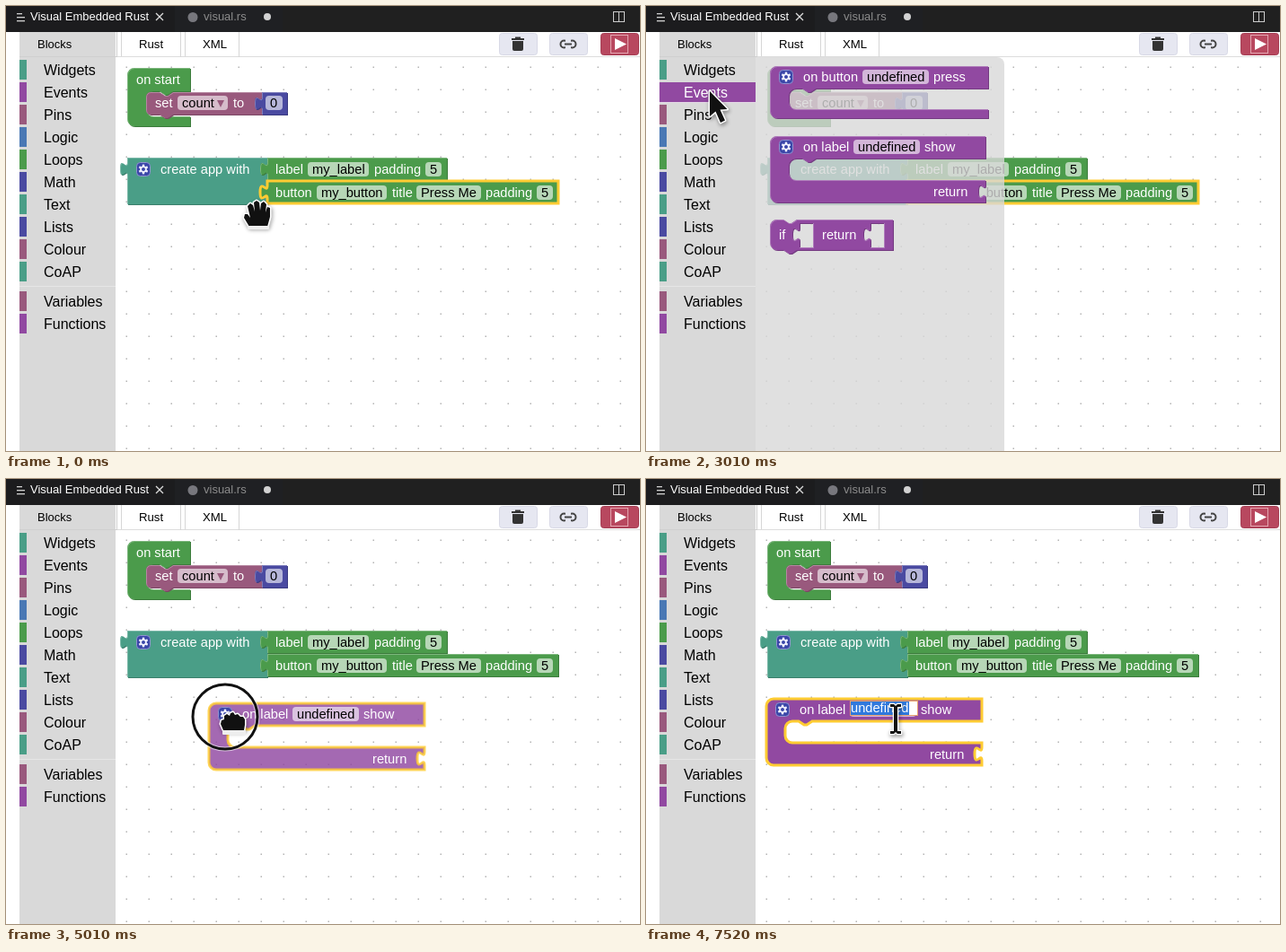
An HTML page with a canvas that plays this animation: 706 px wide and 496 px high, repeating every 8 s.

```html
<!DOCTYPE html>
<html lang="en">
<head>
<meta charset="utf-8">
<title>Block editor</title>
<style>
html, body { margin: 0; width: 100%; height: 100%; overflow: hidden; background: #fff; }
canvas { display: block; width: 706px; height: 496px; }
</style>
</head>
<body>
<canvas id="stage" width="706" height="496"></canvas>
<script>
const ctx = document.getElementById('stage').getContext('2d');
const FONT = '"Liberation Sans", Arial, sans-serif';
const LOOP = 8000;
const C = {
  teal: '#4a9e87', purple: '#9149a1', plum: '#99597d', blue: '#4a78b4',
  green: '#4b9b4b', indigo: '#4a4aa1', yellow: '#fc3'
};
const TOOLBOX = [
  ['Widgets', C.teal], ['Events', C.purple], ['Pins', C.plum], ['Logic', C.blue],
  ['Loops', C.green], ['Math', C.indigo], ['Text', C.teal], ['Lists', C.indigo],
  ['Colour', C.plum], ['CoAP', C.teal], ['Variables', C.plum], ['Functions', C.purple]
];

// start time, cursor kind, x, y, scene state
const STEPS = [
  [0, 'open', 280, 233, { picked: 'button' }],
  [480, 'arrow', 175, 160, { picked: 'button' }],
  [1000, 'arrow', 70, 93, { picked: 'button' }],
  [1470, 'arrow', 70, 93, { picked: 'button', flyout: true }],
  [3540, 'open', 165, 150, { picked: 'button', flyout: true }],
  [4010, 'open', 252, 190, { picked: 'button', flyout: true }],
  [4480, 'fist', 252, 190, { picked: 'label', flyout: true, ring: [243, 183] }],
  [5010, 'fist', 253, 271, { at: [226, 250], drag: true, ring: [244, 265] }],
  [5480, 'open', 161, 267, { at: [134, 245] }],
  [5960, 'open', 205, 265, { at: [134, 245] }],
  [6460, 'beam', 285, 272, { at: [134, 245], field: 'hover' }],
  [6990, 'beam', 278, 267, { at: [134, 245], field: 'edit' }]
];

function rect(x, y, w, h, fill) {
  ctx.fillStyle = fill;
  ctx.fillRect(x, y, w, h);
}

function round(x, y, w, h, r, fill, stroke, width = 1) {
  ctx.beginPath();
  ctx.roundRect(x, y, w, h, r);
  if (fill) { ctx.fillStyle = fill; ctx.fill(); }
  if (stroke) { ctx.strokeStyle = stroke; ctx.lineWidth = width; ctx.stroke(); }
}

function disc(x, y, r, fill) {
  ctx.beginPath();
  ctx.arc(x, y, r, 0, Math.PI * 2);
  ctx.fillStyle = fill;
  ctx.fill();
}

function line(points, color, width) {
  ctx.beginPath();
  points.forEach(([x, y], i) => i ? ctx.lineTo(x, y) : ctx.moveTo(x, y));
  ctx.strokeStyle = color;
  ctx.lineWidth = width;
  ctx.stroke();
}

function text(s, x, y, color = '#fff', size = 14.667) {
  ctx.font = `${size}px ${FONT}`;
  ctx.fillStyle = color;
  ctx.fillText(s, x, y);
}

// Block label and field; y is the middle of the row.
const label = (s, x, y) => text(s, x, y + 5);
function field(s, x, y, w) {
  round(x, y - 8, w, 16, 4, 'rgba(255,255,255,.6)');
  text(s, x + 5, y + 5, '#000');
}

const TAB_DOWN = 'v5c0,10 -8,-8 -8,7.5s8,-2.5 8,7.5';
const TAB_UP = 'c0,-10 -8,8 -8,-7.5s8,2.5 8,-7.5';
const NOTCH = 'l6,4 3,0 6,-4';
const NOTCH_BACK = 'l-6,4 -3,0 -6,-4';

function valuePath(x, y, w, h) {
  return `M${x},${y}h${w}v${h}h${-w}V${y + 20}${TAB_UP}Z`;
}

function stackPath(x, y, w, h, r = 0) {
  return `M${x},${y + r}a${r},${r} 0 0 1 ${r},${-r}H${x + 15}${NOTCH}H${x + w}v${h}H${x + 30}${NOTCH_BACK}H${x + r}a${r},${r} 0 0 1 ${-r},${-r}Z`;
}

function mouthPath(x, y, w, head, foot, h, tab) {
  const wall = x + 21;
  return `M${x},${y + 8}a8,8 0 0 1 8,-8H${x + w}V${y + head}H${wall + 30}${NOTCH_BACK}H${wall + 8}` +
    `a8,8 0 0 0 -8,8V${y + foot - 8}a8,8 0 0 0 8,8H${x + w}${tab ? TAB_DOWN : ''}V${y + h}H${x + 8}a8,8 0 0 1 -8,-8Z`;
}

function block(d, color, picked, alpha = 1) {
  const path = new Path2D(d);
  ctx.save();
  ctx.globalAlpha = alpha;
  if (!picked) {
    ctx.save();
    ctx.translate(1, 1);
    ctx.fillStyle = color;
    ctx.fill(path, 'evenodd');
    ctx.fillStyle = 'rgba(0,0,0,.2)';
    ctx.fill(path, 'evenodd');
    ctx.restore();
  }
  ctx.fillStyle = color;
  ctx.fill(path, 'evenodd');
  if (picked) {
    ctx.strokeStyle = C.yellow;
    ctx.lineWidth = 3;
    ctx.stroke(path);
  } else {
    ctx.clip(path, 'evenodd');
    ctx.translate(.5, .5);
    ctx.strokeStyle = 'rgba(255,255,255,.28)';
    ctx.lineWidth = 1;
    ctx.stroke(path);
  }
  ctx.restore();
}

function gear(x, y) {
  round(x - 7.5, y - 7.5, 15, 15, 4, '#3a46a8', '#8f93d0');
  ctx.save();
  ctx.translate(x, y);
  for (let i = 0; i < 6; i++) {
    ctx.rotate(Math.PI / 3);
    rect(-1.2, -5.4, 2.4, 3, '#f0f0ff');
  }
  ctx.beginPath();
  ctx.arc(0, 0, 2.9, 0, Math.PI * 2);
  ctx.strokeStyle = '#f0f0ff';
  ctx.lineWidth = 1.8;
  ctx.stroke();
  ctx.restore();
}

function labelEvent(x, y, picked, s) {
  block(mouthPath(x, y, 240, 25, 49, 74, true), C.purple, picked, s.drag ? .82 : 1);
  gear(x + 18, y + 12);
  label('on label', x + 37, y + 12);
  field('undefined', x + 93, y + 12, 74);
  label('show', x + 172, y + 12);
  label('return', x + 182, y + 62);
  if (s.field === 'hover') round(x + 94, y + 4, 73, 16, 4, null, '#fff', 2);
  if (s.field === 'edit') {
    rect(x + 94, y + 3, 75, 15, '#fff');
    ctx.strokeStyle = '#e6a070';
    ctx.lineWidth = 1;
    ctx.strokeRect(x + 93.5, y + 2.5, 75, 16);
    rect(x + 94, y + 3, 65, 15, '#3079dd');
    text('undefined', x + 94, y + 15);
  }
}

function workspace(s) {
  for (let x = 134; x < 706; x += 25)
    for (let y = 68; y < 496; y += 25) rect(x - .5, y - .5, 1.5, 1.5, '#b4b4b4');

  block(mouthPath(135, 69, 70, 26, 54, 65), C.green);
  label('on start', 145, 82);
  block(stackPath(156, 96, 129, 25, 5), C.plum);
  label('set', 166, 108);
  field('count', 191, 108, 56);
  ctx.fillStyle = C.plum;
  ctx.fill(new Path2D('M235,105h8l-4,8Z'));
  label('to', 253, 108);
  block(valuePath(285, 96, 28, 25), C.indigo);
  field('0', 289, 108, 19);

  block(valuePath(135, 169, 156, 52), C.teal);
  gear(153, 182);
  label('create app with', 172, 182);
  block(valuePath(291, 169, 200, 25), C.green);
  label('label', 300, 182);
  field('my_label', 336, 182, 68);
  label('padding', 410, 182);
  field('5', 467, 182, 18);
  block(valuePath(291, 195, 324, 25), C.green, s.picked === 'button');
  label('button', 300, 208);
  field('my_button', 346, 208, 78);
  label('title', 430, 208);
  field('Press Me', 457, 208, 72);
  label('padding', 534, 208);
  field('5', 591, 208, 18);
}

function flyout(s) {
  round(122, 57, 277, 450, [0, 8, 0, 0], 'rgba(217,217,217,.8)');
  block(mouthPath(138, 67, 243, 25, 48, 58), C.purple);
  gear(156, 79);
  label('on button', 175, 79);
  field('undefined', 241, 79, 74);
  label('press', 320, 79);

  labelEvent(138, 145, s.picked === 'label', s);

  block(stackPath(138, 238, 137, 34, 8) + valuePath(171, 242, 15, 27) + valuePath(250, 242, 15, 27), C.purple);
  label('if', 148, 255);
  label('return', 196, 255);
}

function toolbox(open) {
  rect(15, 29, 107, 467, '#d9d9d9');
  TOOLBOX.forEach(([name, color], i) => {
    const y = 60 + 25 * i + (i > 9 ? 8 : 0);
    const on = open && name === 'Events';
    rect(15, y, on ? 107 : 8, 22, color);
    if (on) rect(15, y + 22, 107, 1, '#e4d8e6');
    text(name, 42, y + 17, on ? '#fff' : '#000', 16);
  });
  rect(15, 312, 107, 1, '#e6e6e6');
}

function header() {
  rect(0, 0, 706, 29, '#202020');
  rect(0, 0, 188, 29, '#1c1c1e');
  rect(188, 0, 120, 29, '#1f2023');
  [[12, 8, 6], [12, 12, 9], [12, 16, 9]].forEach(([x, y, w]) => rect(x, y, w, 1.3, '#d0d0d0'));
  text('Visual Embedded Rust', 27, 16, '#fff', 13);
  line([[167, 8], [175, 16]], '#ddd', 1.2);
  line([[175, 8], [167, 16]], '#ddd', 1.2);
  disc(208, 12.5, 5.5, '#77777d');
  text('visual.rs', 220, 16, '#8c8c8c', 13);
  disc(291, 12, 4, '#d2d2d2');
  ctx.strokeStyle = '#ccc';
  ctx.lineWidth = 1;
  ctx.strokeRect(676.5, 6.5, 12, 11);
  line([[682.5, 6], [682.5, 18]], '#ccc', 1);

  rect(122, 56, 584, 1, '#dcdcdc');
  rect(15, 56, 108, 1, '#cfcfcf');
  rect(123, 29, 1, 28, '#d0d0d0');
  text('Blocks', 35, 47, '#000', 13);
  [[128, 66, 'Rust', 148], [199, 60, 'XML', 219]].forEach(([x, w, name, tx]) => {
    rect(x, 29, w, 28, '#fff');
    rect(x, 29, 1, 28, '#d6d6d6');
    rect(x + w, 29, 1, 28, '#d6d6d6');
    rect(x, 56, w, 1, '#dcdcdc');
    text(name, tx, 47, '#000', 13.2);
  });

  [549, 605, 662].forEach((x, i) =>
    round(x + .5, 30.5, 42, 24, 3, i < 2 ? '#e6e7f1' : '#b8485f', i < 2 ? '#d8d9e6' : '#a53d53'));
  rect(563, 36, 14, 2, '#333');
  rect(567, 34.5, 6, 2, '#333');
  round(564, 39, 12, 11, [0, 0, 2, 2], '#333');
  round(617.5, 38.5, 8, 8, 4, null, '#444', 2);
  round(626.5, 38.5, 8, 8, 4, null, '#444', 2);
  rect(623, 37, 6, 11, '#e6e7f1');
  rect(622, 41.5, 8, 2, '#444');
  ctx.strokeStyle = '#e3a5b0';
  ctx.lineWidth = 1;
  ctx.strokeRect(673.5, 32.5, 19, 20);
  ctx.fillStyle = '#fff';
  ctx.fill(new Path2D('M678,36L691,42.5L678,49Z'));
}

function outlined(path, width) {
  ctx.save();
  ctx.lineJoin = 'round';
  ctx.shadowColor = 'rgba(0,0,0,.45)';
  ctx.shadowBlur = 4;
  ctx.shadowOffsetX = 1;
  ctx.shadowOffsetY = 2;
  ctx.strokeStyle = '#fff';
  ctx.lineWidth = width;
  ctx.stroke(path);
  ctx.restore();
  ctx.fillStyle = '#111';
  ctx.fill(path);
}

const SHAPES = {
  arrow: new Path2D('M1,2V30L7.5,24.5L13,37L18,34.5L12.5,22.5L20.5,22Z'),
  open: new Path2D('M-9,13L-15,3L-14,-1L-11,-1L-8,3L-11,-10L-8,-13L-5,-11L-3,-4L-4,-14L-1,-16L2,-14L3,-5L4,-13L7,-15L10,-12L9,-3L11,-9L14,-8L14,2L11,13Z'),
  fist: new Path2D('M-11,9L-14,2L-13,-2L-10,-3L-10,-7L-7,-9L-4,-7L-3,-10L0,-11L2,-8L5,-9L8,-6L11,-6L13,-3L13,3L12,9Z'),
  beam: new Path2D('M-6,-16H-2L0,-14L2,-16H6V-13H2V14H6V17H2L0,15L-2,17H-6V14H-2V-13H-6Z')
};

function cursor(kind, x, y) {
  ctx.save();
  ctx.translate(x, y);
  outlined(SHAPES[kind], kind === 'beam' ? 2.5 : 3);
  if (kind === 'open') round(-11, 12, 24, 4, 1, '#eee');
  if (kind === 'fist') round(-12, 9, 26, 5, 1, '#eee');
  ctx.restore();
}

function ring([x, y]) {
  ctx.beginPath();
  ctx.arc(x, y, 36, 0, Math.PI * 2);
  for (const [color, width] of [['rgba(255,255,255,.6)', 5], ['#111', 3]]) {
    ctx.strokeStyle = color;
    ctx.lineWidth = width;
    ctx.stroke();
  }
}

function draw(now) {
  const t = now % LOOP;
  const [, kind, x, y, s] = STEPS.findLast(step => step[0] <= t);
  rect(0, 0, 706, 496, '#fff');
  workspace(s);
  if (s.flyout) flyout(s);
  if (s.at) labelEvent(...s.at, true, s);
  toolbox(s.flyout);
  header();
  if (s.ring) ring(s.ring);
  cursor(kind, x, y);
}

const start = performance.now();
function tick() {
  draw(performance.now() - start);
  requestAnimationFrame(tick);
}
tick();
</script>
</body>
</html>
```
